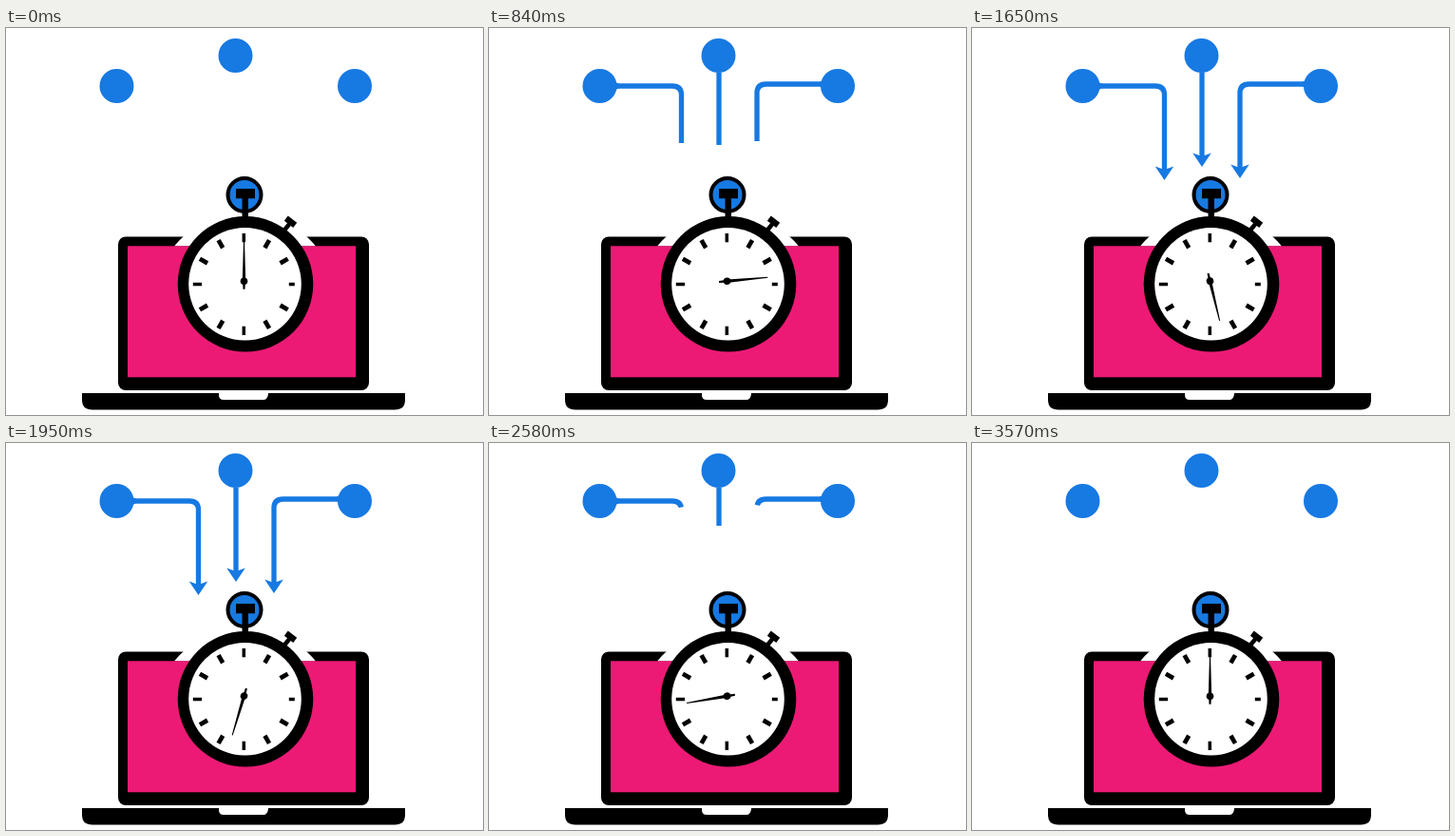
Write an HTML page that moves like this. It is 502 by 407 pixels and loops after 3600 ms.

```html
<!DOCTYPE html>
<html lang="en">
<head>
<meta charset="utf-8">
<title>Stopwatch and laptop</title>
<style>
  html, body { margin: 0; width: 100%; height: 100%; overflow: hidden; background: #fff; }
  svg { display: block; width: 502px; height: 407px; }
</style>
</head>
<body>
<svg id="stage" viewBox="0 0 502 407">
  <defs id="masks"></defs>

  <g id="arrows" fill="#1779e2" stroke="none"></g>
  <g fill="#1779e2">
    <circle cx="116.5" cy="61" r="18"/>
    <circle cx="241.5" cy="29" r="18"/>
    <circle cx="367" cy="61" r="18"/>
  </g>

  <!-- laptop -->
  <rect x="118" y="219.5" width="264" height="161.5" rx="8"/>
  <path d="M177 229.5A84.5 84.5 0 0 1 187 219H316A84.5 84.5 0 0 1 326 229.5Z" fill="#fff"/>
  <rect x="128" y="229.3" width="240" height="138" fill="#ec1a75"/>
  <path d="M80 384H420V391Q420 401.5 409 401.5H91Q80 401.5 80 391Z"/>
  <path d="M224 383.5H276V385Q275 391 271 391H229Q224 391 224 386Z" fill="#fff"/>

  <!-- stopwatch -->
  <circle cx="251" cy="175.5" r="17.5" fill="#1779e2" stroke="#000" stroke-width="4"/>
  <path d="M242 169H262V179.3H255V200H248.5V179.3H242Z"/>
  <path d="M291 215L300 204" stroke="#000" stroke-width="4.5"/>
  <path d="M294.8 200.2L304.2 207.3" stroke="#000" stroke-width="6.5"/>
  <circle cx="252" cy="269.3" r="71.3"/>
  <circle cx="251.5" cy="269.3" r="59.3" fill="#fff"/>
  <g id="ticks" stroke="#000"></g>
  <g id="hand">
    <path d="M-.5-43H.5L1.6-4L1 8.5H-1L-1.6-4Z"/>
    <circle r="3.8"/>
  </g>
</svg>
<script>
const LOOP = 3600, STEP = 30, GROW = 1200;
const $ = id => document.getElementById(id);

const arrows = [
  { path: "M133 61H193Q202.5 61 202.5 70.5V", x: 202.5, tip: 160, base: "M129 52Q133 58 138 59V63Q133 64 129 70Z", shrink: [1970, 3055] },
  { path: "M242 47V", x: 242, tip: 146, base: "", shrink: [2005, 2965] },
  { path: "M352 59H291.5Q282 59 282 68.5V", x: 282, tip: 158, base: "M354 51Q351 56 348 56.5V61.5Q351 62 354 68Z", shrink: [1970, 3055] }
];

arrows.forEach(({ path, x, tip, base }, i) => {
  $("masks").innerHTML += `<mask id="reveal${i}" maskUnits="userSpaceOnUse" x="0" y="0" width="502" height="407">
    <path id="wipe${i}" d="${path}${tip + 1}" pathLength="1" stroke-dasharray="1 2" fill="none" stroke="#fff" stroke-width="22"/></mask>`;
  $("arrows").innerHTML += `<g mask="url(#reveal${i})">
    <path d="${path}${tip - 8}" fill="none" stroke="#1779e2" stroke-width="5.3"/>
    <path d="${base}M${x} ${tip}l-9.8-14.5l9.8 3.5l9.8-3.5Z"/></g>`;
});

for (let i = 0; i < 12; i++) {
  const cardinal = i % 3 === 0;
  const inner = i === 3 ? 47.5 : 44.2;
  $("ticks").innerHTML += `<path d="M0-${inner}V-53.5" stroke-width="${cardinal ? 3.5 : 4.7}"
    transform="translate(250.3 269.5) rotate(${i * 30})"/>`;
}

const clamp = v => Math.max(0, Math.min(1, v));

function extent(t, [start, end]) {
  const u = clamp(t / GROW);
  return t < start ? u * (1.28 - 0.28 * u) : clamp((end - t) / (end - start));
}

function draw(now) {
  const t = Math.floor((now % LOOP) / STEP) * STEP;
  $("hand").setAttribute("transform", `translate(250.5 266.2) rotate(${360 * t / (LOOP - STEP)})`);
  arrows.forEach(({ shrink }, i) => {
    const p = extent(t, shrink);
    const wipe = $("wipe" + i);
    wipe.setAttribute("stroke-dashoffset", 1 - p);
    wipe.setAttribute("visibility", p > 0 ? "visible" : "hidden");
  });
}

const begin = performance.now();
function loop() {
  draw(performance.now() - begin);
  requestAnimationFrame(loop);
}
loop();
</script>
</body>
</html>
```
